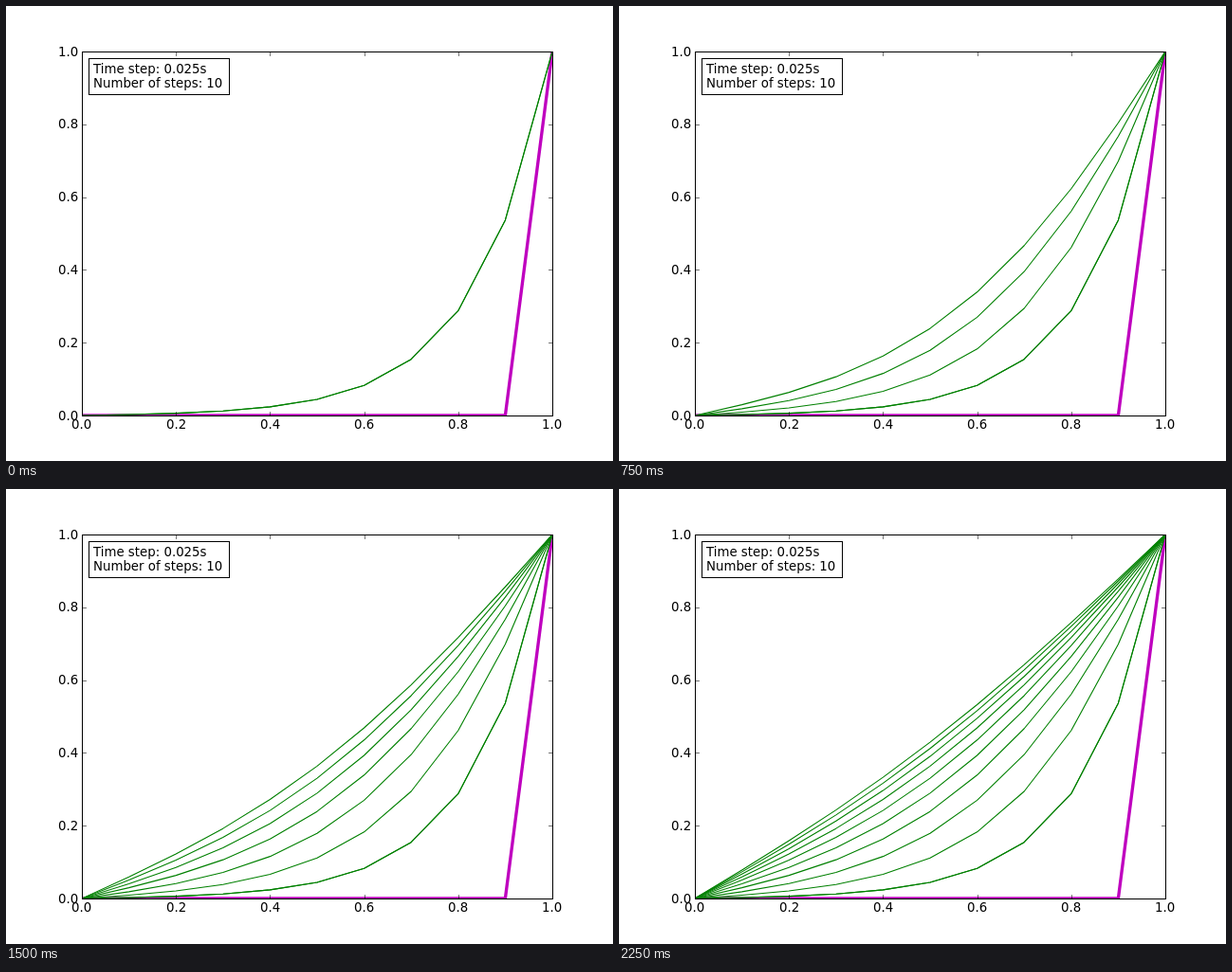
Write an HTML page with a canvas that moves like this. It is 640 px wide and 480 px high and loops after 2.5 s.

```html
<!DOCTYPE html>
<html lang="en">
<head>
<meta charset="utf-8">
<title>Implicit heat diffusion</title>
<style>
  html, body { margin: 0; width: 100%; height: 100%; overflow: hidden; background: #fff; }
  canvas { display: block; }
</style>
</head>
<body>
<canvas id="plot" width="640" height="480"></canvas>
<script>
const ctx = document.getElementById('plot').getContext('2d');
const LEFT = 80, TOP = 48, W = 496, H = 384;
const CELLS = 10, STEPS = 10, STEP_MS = 250;
const DT = 0.025, R = DT * CELLS * CELLS;
const PT = 80 / 72;

const px = x => LEFT + W * x;
const py = y => TOP + H * (1 - y);
const snap = v => Math.floor(v + 0.5) + 0.5;

// One backward Euler step of u_t = u_xx with fixed ends (Thomas algorithm)
function diffuse(u) {
  const c = [0], d = [u[0]];
  for (let i = 1; i < CELLS; i++) {
    const m = 1 + 2 * R - R * c[i - 1];
    c[i] = R / m;
    d[i] = (u[i] + R * d[i - 1]) / m;
  }
  const next = u.slice();
  for (let i = CELLS - 1; i > 0; i--) next[i] = d[i] + c[i] * next[i + 1];
  return next;
}

const profiles = [Array.from({ length: CELLS + 1 }, (_, i) => i === CELLS ? 1 : 0)];
for (let n = 0; n < STEPS; n++) profiles.push(diffuse(profiles[n]));

function curve(u, color, width) {
  ctx.strokeStyle = color;
  ctx.lineWidth = width * PT;
  ctx.lineJoin = 'round';
  ctx.lineCap = 'square';
  ctx.beginPath();
  u.forEach((v, i) => ctx.lineTo(px(i / CELLS), py(v)));
  ctx.stroke();
}

function segment(x, y, dx, dy) {
  ctx.beginPath();
  ctx.moveTo(x, y);
  ctx.lineTo(x + dx, y + dy);
  ctx.stroke();
}

function axes() {
  const tick = 4 * PT;
  const right = LEFT + W + 0.5, bottom = TOP + H + 0.5;
  ctx.strokeStyle = ctx.fillStyle = '#000';
  ctx.lineCap = 'butt';
  ctx.lineJoin = 'miter';
  ctx.lineWidth = 0.5 * PT;
  for (let i = 0; i <= 5; i++) {
    const v = i / 5, x = px(v), y = py(v), label = v.toFixed(1);
    segment(snap(x), bottom, 0, -tick);
    segment(snap(x), TOP + 0.5, 0, tick);
    segment(LEFT + 0.5, snap(y), tick, 0);
    segment(right, snap(y), -tick, 0);
    ctx.fillText(label, Math.round(x - 10.6), 446);
    ctx.fillText(label, 55, Math.floor(y + 5));
  }
  ctx.lineWidth = 1;
  ctx.strokeRect(LEFT + 0.5, TOP + 0.5, W, H);
}

function legend() {
  ctx.fillStyle = '#fff';
  ctx.fillRect(87.5, 55.5, 148, 38);
  ctx.strokeRect(87.5, 55.5, 148, 38);
  ctx.fillStyle = '#000';
  ctx.fillText(`Time step: ${DT}s`, 92, 71);
  ctx.fillText(`Number of steps: ${STEPS}`, 92, 86);
}

function draw(count) {
  ctx.fillStyle = '#fff';
  ctx.fillRect(0, 0, 640, 480);
  ctx.font = `${12 * PT}px "DejaVu Sans", sans-serif`;
  ctx.save();
  ctx.beginPath();
  ctx.rect(LEFT, TOP, W + 1, H + 1);
  ctx.clip();
  curve(profiles[0], '#bf00bf', 3);
  // the first step is plotted twice, which makes it look heavier
  curve(profiles[1], '#008000', 1);
  for (let n = 1; n <= count; n++) curve(profiles[n], '#008000', 1);
  ctx.restore();
  axes();
  legend();
}

const start = performance.now();
function frame() {
  const t = (performance.now() - start) % (STEPS * STEP_MS);
  draw(Math.floor(t / STEP_MS) + 1);
  requestAnimationFrame(frame);
}
frame();
</script>
</body>
</html>
```
